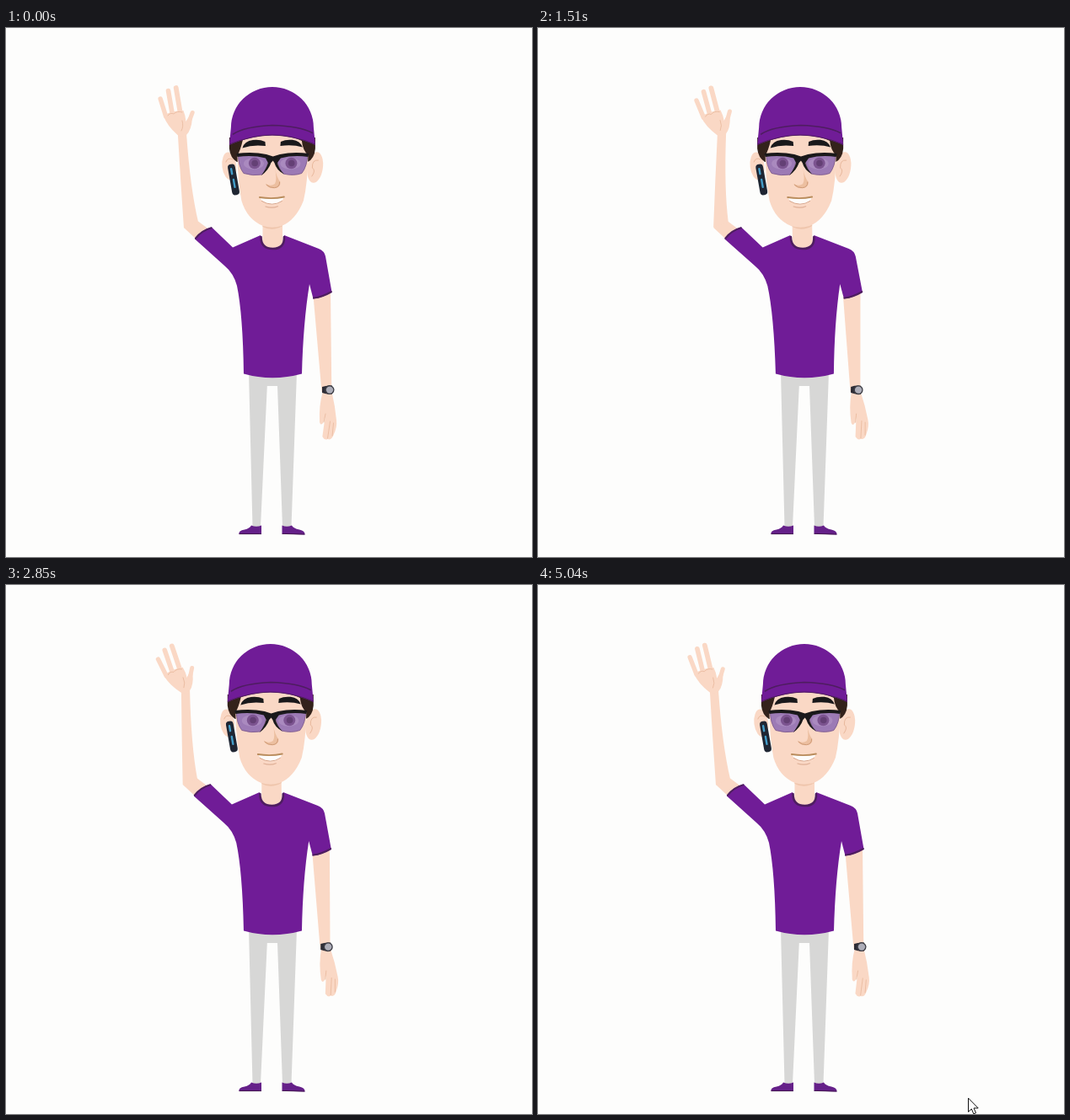
Recreate the animation shown at these times as an HTML page with a canvas. Size 624 by 628 pixels, loop 5.07 s.

```html
<!DOCTYPE html>
<html lang="en">
<head>
<meta charset="utf-8">
<title>Waving man</title>
<style>
html, body { margin: 0; width: 100%; height: 100%; overflow: hidden; background: #fdfdfc; }
canvas { display: block; }
</style>
</head>
<body>
<canvas id="stage" width="624" height="628"></canvas>
<script>
const ctx = document.getElementById('stage').getContext('2d');
const LOOP = 5070, SWAY = 1030, WAVE = SWAY * 2 / 3, ACTIVE = SWAY * 3;
const TAU = Math.PI * 2, DEG = Math.PI / 180;

const C = {
  bg: '#fdfdfc', skin: '#fad8c5', shade: '#e8b89c', purple: '#701c97', dark: '#4e1d60',
  pants: '#d7d7d6', shoe: '#652089', hair: '#33221b', black: '#1a191b', lens: '#9c7ab5'
};

function fill(d, color) {
  ctx.fillStyle = color;
  ctx.fill(new Path2D(d));
}

function line(d, color, width) {
  ctx.strokeStyle = color;
  ctx.lineWidth = width;
  ctx.lineCap = ctx.lineJoin = 'round';
  ctx.stroke(new Path2D(d));
}

function oval(x, y, rx, ry, color, turn = 0) {
  ctx.fillStyle = color;
  ctx.beginPath();
  ctx.ellipse(x, y, rx, ry, turn, 0, TAU);
  ctx.fill();
}

function group(draw) {
  ctx.save();
  draw();
  ctx.restore();
}

function pivot(x, y, angle) {
  ctx.translate(x, y);
  ctx.rotate(angle);
  ctx.translate(-x, -y);
}

function pose(t) {
  if (t >= ACTIVE) return { sway: 0, wave: -4, swing: -1.2 };
  const s = -Math.sin(TAU * t / WAVE);
  return {
    sway: (1 - Math.cos(TAU * t / SWAY)) / 2,
    wave: s * (s > 0 ? 27 : 10) - 4 * t / ACTIVE,
    swing: s * 6 - 1.2 * t / ACTIVE
  };
}

function legs() {
  fill('M288 408 L292.5 592 H302 L309.8 425 H322 L328 592 H338.5 L345 408Z', C.pants);
  fill('M276.5 601 Q275.5 596.5 283 595.5 Q289 594 291 590.5 Q297 593 303 590.5 V601Z', C.shoe);
  fill('M354.5 601.5 Q355 597 348 595.5 Q341 594 339 590.5 Q333 593 327.5 590.5 V600.5Z', C.shoe);
  line('M277 600.6 H302.5 M328 600.4 L354 601', '#43164f', 1);
}

function restingArm(p) {
  ctx.translate(-2.4 * p.sway, 0);
  pivot(374, 300, 0.012 * p.sway);
  fill('M364 312 L374.5 432 H386.3 L385 312Z', C.skin);
  group(() => {
    pivot(380, 432, p.swing * DEG);
    fill('M376 431 Q371 448 372 468 Q373.5 473 376.5 468 L378.5 462 L375.3 485 Q378 490 381.5 488 ' +
      'Q386 490 388.5 483 Q393 474 392 466 Q390.5 449 386.3 431Z', C.skin);
    line('M377 468 L379 458 M381.5 487 L384.5 467 M387 484 L388.5 469', C.shade, .8);
  });
  fill('M375 426 Q380 424 387 424.5 V434.5 Q380 435 375 433Z', '#2d2c35');
  oval(383.7, 429.6, 5.8, 5.5, '#3a3a42');
  oval(384, 429.6, 4.2, 4.1, '#adadb8');
}

function wavingArm(p) {
  ctx.translate(-2.8 * p.sway, 0);
  fill('M211 237 L226 251 L246 243 L228 229.5 L218 230Z', C.skin);
  pivot(219, 236, 6.2 * DEG * p.sway);
  fill('M203.8 125 Q207 180 211 237.5 L228 230 Q218.5 190 214 125Z', C.skin);
  pivot(208.5, 128, p.wave * DEG);
  fill('M186.8 104 Q196 98 210.5 98 Q213 104 213.5 111 L217.5 105 L221 107 ' +
    'Q220 121 214 127 Q209 131 203.5 127 Q191 116 186.8 104Z', C.skin);
  line('M189.7 105 L183.2 84', C.skin, 5.4);
  line('M197.7 104 L192.6 74.5', C.skin, 5.6);
  line('M207 102 L201.8 71', C.skin, 5.8);
  line('M214.5 115 Q219 108 221.2 100.5', C.skin, 5);
  line('M192 104 Q195 100 199 102 Q203 98 209 100 M209 110 Q211 117 208 122', C.shade, .8);
}

function torso() {
  fill('M304.5 226 H328 V247 Q331 266 316.5 266 Q302 266 304.5 247Z', C.skin);
  fill('M304.5 230 H328 V235 Q316 242 304.5 236Z', '#efc5ac');
  fill('M302 246 L269 260.5 L244 236.5 Q231 240 224 250.5 L259 282 Q270 291 274 306 ' +
    'Q281 340 282 410.5 Q316 420 351 410.5 Q352.5 350 360 304 L364.5 321.5 Q376 320 386.5 313.5 ' +
    'L379 271 Q377.5 264.5 371 262 L330 246 Q332 261.5 316.5 261.5 Q301 261.5 302 246Z', C.purple);
  line('M302.5 248 Q302.5 262 316.5 262 Q330.5 262 330 248', C.dark, 2.6);
  line('M225 249.7 Q232 240.5 243.5 237.3 M365 320.5 Q376 319 385.8 313.2', C.dark, 2.2);
}

function glasses() {
  const left = 'M275.5 150 Q295 149 311.5 153 Q311 165 304 174 Q293 176 282 172.5 Q275.5 164 275.5 150Z';
  const right = 'M358 150 Q339 149 321.5 153 Q322 165 329 173 Q341 176 351 172.5 Q357.5 164 358 150Z';
  for (const [lens, x] of [[left, 295], [right, 338.5]]) {
    fill(lens, C.lens);
    oval(x - 1, 161, 12, 6.8, '#aa8abf');
    oval(x, 160.5, 7, 6.8, '#7c5490');
    oval(x + .3, 160.5, 3.8, 3.8, '#644075');
    line(lens, '#765488', .8);
  }
  fill('M273.5 149 Q293 146.5 309 150 L316.8 152.5 L325 150 Q341 146.5 359.5 149 L358.5 153 ' +
    'Q341 150.5 326 154.5 L322 160 Q323.5 167 330 173.5 Q321 169 318.5 160 L316.8 157.5 ' +
    'L314.5 160 Q311.5 169 303 175 Q309 167 311 160 L308 154.5 Q293 150.5 274.5 153Z', C.black);
}

function earpiece() {
  pivot(270, 180, -10 * DEG);
  ctx.fillStyle = '#1f2633';
  ctx.beginPath();
  ctx.roundRect(265.7, 161.5, 8.8, 37, 4);
  ctx.fill();
  line('M269.5 167 V173 M270 180 V189', '#439dc9', 2.4);
}

function head(p) {
  ctx.translate(-4.8 * p.sway - .1, 0);
  oval(265, 164, 8.5, 16.5, C.skin, -.12);
  oval(366.8, 165.5, 9.2, 18.5, C.skin, .14);
  line('M261 159 Q263 153 269 156 M370.5 157 Q363 156 363.5 166 Q368 169 363 176', C.shade, 1);
  fill('M265 130 V143 Q266 154 274 159 H358 Q366 155 367 143 V130Z', C.hair);
  fill('M274.5 151 Q278 146 281 133 Q300 126 317 126 Q338 127 351 134 Q352 145 358.5 151 ' +
    'Q358 184 353 205 Q344 228 327 235 Q316 238.5 305 235 Q286 227 279.5 205 Q275 182 274.5 151Z', C.skin);
  fill('M265 139 L267 118 A49 48 0 0 1 365 118 L367 139 ' +
    'C350 131.5 333 127.5 316 127.5 C299 127.5 282 131.5 265 139Z', C.purple);
  line('M269.5 126 Q283 117 316 115.5 Q349 116.5 363.5 124.5', C.dark, 1.6);
  line('M266 137.8 C283 131 299 127 316 127 C333 127 349 131 366 137.8', C.dark, 1.2);
  fill('M280.5 142.5 Q283 134 293 133 Q301 132 307.5 135 L308 140 Q293 138 280.5 142.5Z', C.black);
  fill('M352 141.5 Q349 134 340 132.8 Q332 132 326 135 L325.5 140 Q340 138 352 141.5Z', C.black);
  fill('M319 166 Q321 177 325.5 183 Q326 189 319 190 Q311 191 308.5 185.5 Q315 188 319 185 Q322 180 319 166Z', '#ecbfa0');
  line('M309 186 Q313 190 318.5 189.7 Q325 189 324.7 183', '#cf9a76', 1);
  glasses();
  fill('M301 201 Q316 204 330 200.5 Q327 209.5 316 209.5 Q305 209 301 201Z', '#fdfcfb');
  line('M301 201 Q316 203.5 330 200.5', '#b98c5c', 1.8);
  line('M303.5 205.5 Q316 213 327.5 205.5', '#d9a68b', 1);
  line('M308 212 Q316 214.5 322.5 211.7', '#dfb098', 1.2);
  group(earpiece);
}

// time, x, y of the pointer tip
const trail = [
  [3200, 590, 593], [3290, 480, 594], [3390, 433, 598], [3480, 436, 599],
  [3820, 510, 609], [4100, 518, 609], [4500, 514, 609], [4800, 510, 609], [LOOP, 510, 609]
];

function pointer(t) {
  if (t < trail[0][0]) return;
  const i = trail.findIndex(k => k[0] > t);
  const [t0, x0, y0] = trail[i - 1], [t1, x1, y1] = trail[i];
  const u = (t - t0) / (t1 - t0), e = u * u * (3 - 2 * u);
  ctx.translate(Math.round(x0 + (x1 - x0) * e) + .5, Math.round(y0 + (y1 - y0) * e) + .5);
  const arrow = 'M0 0 V16 L3.8 12.5 L6.3 18.3 L9 17.2 L6.5 11.5 H11.3Z';
  fill(arrow, '#fff');
  line(arrow, '#111', 1);
}

function draw(t) {
  const p = pose(t);
  ctx.fillStyle = C.bg;
  ctx.fillRect(0, 0, 624, 628);
  legs();
  group(() => restingArm(p));
  group(() => wavingArm(p));
  group(() => {
    // lean from the waist
    const k = 5 * p.sway / 315;
    ctx.transform(1, 0, k, 1, -415 * k, 0);
    torso();
  });
  group(() => head(p));
  group(() => pointer(t));
}

const start = performance.now();
function tick() {
  draw((performance.now() - start) % LOOP);
  requestAnimationFrame(tick);
}
tick();
</script>
</body>
</html>
```
